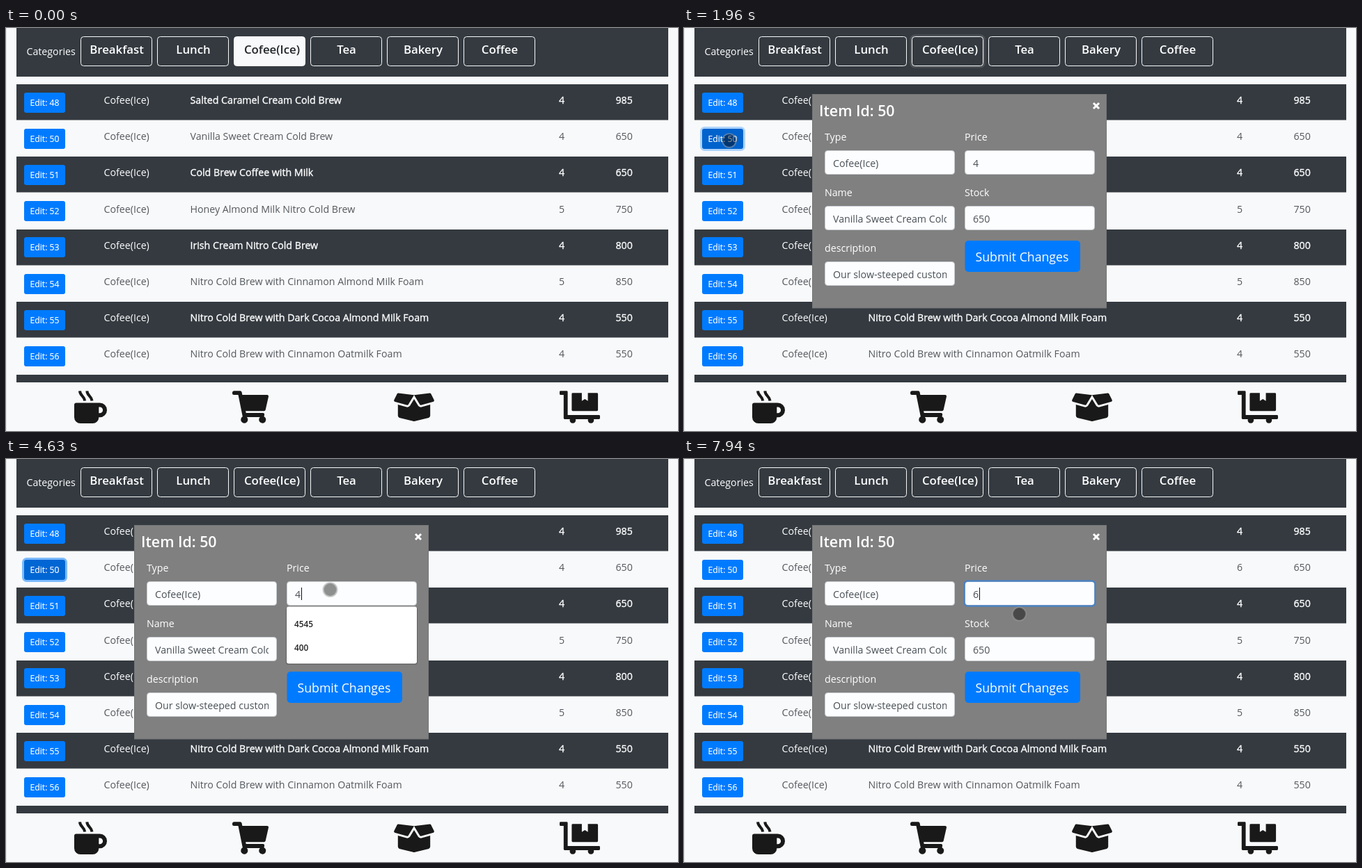
These frames come from a looping animation (965x580 px, 8000 ms). An HTML page:

```html
<!DOCTYPE html>
<html lang="en">
<head>
<meta charset="utf-8">
<title>Menu inventory</title>
<style>
  html, body { margin: 0; width: 100%; height: 100%; overflow: hidden; background: #f8f9fa; }
  svg { display: block; width: 965px; height: 580px; }
  text { font: 14.2px "Open Sans", "Noto Sans", sans-serif; fill: #fff; white-space: pre; }
  .tab { font-size: 16.8px; font-weight: 600; text-anchor: middle; }
  .edit { font-size: 12.2px; stroke: #fff; stroke-width: .15px; }
  .light { fill: #54585d; }
  .strong { stroke: #fff; stroke-width: .35px; }
  .title { font-size: 21.3px; font-weight: 600; }
  .value { fill: #495057; }
  .submit { font-size: 17.7px; }
  .option { font-size: 11.8px; font-weight: 600; fill: #222; }
  .icon { fill: #191919; fill-rule: evenodd; }

  /* One loop is 8000 ms, so 1% equals 80 ms. */
  .anim { animation: 8s step-end infinite; }
  #tabFill { animation-name: tabFill; }
  #tabText { animation-name: tabText; }
  #tabRing { animation-name: tabRing; }
  #editFill { animation-name: editFill; }
  #editRing { animation-name: editRing; }
  #modal { animation-name: modal; }
  #inputRing { animation-name: inputRing; }
  #options { animation-name: options; }
  #caret { animation-name: caret; }
  #dot { animation-name: dot; }
  .before { animation-name: before; }
  .after { animation-name: after; }

  @keyframes tabFill { 0% { fill: #f8f9fa } 23% { fill: #85898d } 24.5%, 100% { fill: #343a40 } }
  @keyframes tabText { 0% { fill: #212529 } 23% { fill: #a6a9ab } 24.5%, 100% { fill: #fff } }
  @keyframes tabRing { 0% { opacity: 0 } 20% { opacity: .5 } 21.5% { opacity: 1 } 24.5% { opacity: .25 } 26%, 100% { opacity: 0 } }
  @keyframes editFill {
    0% { fill: #007bff } 23% { fill: #006ce0 } 24.5% { fill: #0062cc }
    26% { fill: #0066d3 } 59.375% { fill: #0071ea } 60.875%, 100% { fill: #007bff }
  }
  @keyframes editRing { 0% { opacity: 0 } 24.5% { opacity: .6 } 26% { opacity: 1 } 59.375% { opacity: .5 } 60.875%, 100% { opacity: 0 } }
  @keyframes modal { 0% { opacity: 0 } 24.5%, 100% { opacity: 1 } }
  @keyframes inputRing { 0% { opacity: 0 } 59.375% { opacity: .6 } 60.875%, 100% { opacity: 1 } }
  @keyframes options { 0% { opacity: 0 } 57.875% { opacity: 1 } 75.625%, 100% { opacity: 0 } }
  @keyframes before { 0% { opacity: 1 } 75.625%, 100% { opacity: 0 } }
  @keyframes after { 0% { opacity: 0 } 86.5%, 100% { opacity: 1 } }
  @keyframes caret {
    0% { opacity: 0; transform: translateX(8px) }
    57.875% { opacity: 1; transform: translateX(8px) }
    64% { opacity: 0; transform: translateX(8px) }
    70.625% { opacity: 1; transform: translateX(8px) }
    75.625% { opacity: 1; transform: none }
    80.25% { opacity: 0; transform: none }
    86.5% { opacity: 1; transform: translateX(8px) }
    93% { opacity: 0; transform: translateX(8px) }
    99.25%, 100% { opacity: 1; transform: translateX(8px) }
  }
  @keyframes dot {
    0% { opacity: 0; transform: translate(65px, 162px) }
    3.5% { opacity: 1; transform: translate(65px, 162px) }
    23% { opacity: 0; transform: translate(65px, 162px) }
    24.5% { opacity: 1; transform: translate(65px, 162px) }
    40.125% { opacity: 1; transform: translate(71px, 174px) }
    42% { opacity: 1; transform: translate(100px, 205px) }
    43.5% { opacity: 1; transform: translate(175px, 252px) }
    45% { opacity: 1; transform: translate(260px, 274px) }
    46.5% { opacity: 0; transform: translate(260px, 274px) }
    48.375% { opacity: 1; transform: translate(381px, 255px) }
    50.25% { opacity: 1; transform: translate(421px, 224px) }
    51.75% { opacity: 1; transform: translate(450px, 200px) }
    53.25% { opacity: 1; transform: translate(465.5px, 188px) }
    59.375% { opacity: 1; transform: translate(467px, 190px) }
    99.25%, 100% { opacity: 1; transform: translate(481.5px, 223px) }
  }
</style>
</head>
<body>
<svg id="stage" viewBox="0 0 965 580"></svg>
<script>
  const rect = (x, y, w, h, fill, attrs = '') =>
    `<rect x="${x}" y="${y}" width="${w}" height="${h}" fill="${fill}" ${attrs}/>`;
  const text = (x, y, str, cls = '', attrs = '') =>
    `<text x="${x}" y="${y}" class="${cls}" ${attrs}>${str}</text>`;
  const ring = (id, x, y, w, h, color, width) =>
    rect(x, y, w, h, 'none', `id="${id}" class="anim" rx="5" stroke="${color}" stroke-width="${width}"`);

  const ROW = 52.2;
  const items = [
    [48, 'Salted Caramel Cream Cold Brew', 4, 985],
    [50, 'Vanilla Sweet Cream Cold Brew', 4, 650],
    [51, 'Cold Brew Coffee with Milk', 4, 650],
    [52, 'Honey Almond Milk Nitro Cold Brew', 5, 750],
    [53, 'Irish Cream Nitro Cold Brew', 4, 800],
    [54, 'Nitro Cold Brew with Cinnamon Almond Milk Foam', 5, 850],
    [55, 'Nitro Cold Brew with Dark Cocoa Almond Milk Foam', 4, 550],
    [56, 'Nitro Cold Brew with Cinnamon Oatmilk Foam', 4, 550],
  ];

  function tab(name, i) {
    const x = 107.5 + 110 * i, active = i === 2;
    const label = text(active ? 382 : x + 51.5, 37, name, active ? 'tab anim' : 'tab', active ? 'id="tabText"' : '');
    return (active ? ring('tabRing', 326, 11, 105, 45, '#999c9f', 3) : '') +
      rect(x, 12.5, 102, 42, 'none', `rx="4" stroke="#f8f9fa" ${active ? 'id="tabFill" class="anim"' : ''}`) + label;
  }

  function row([id, name, price, stock], i) {
    const top = 81 + ROW * i, base = Math.round(top + 28), dark = i % 2 === 0;
    const edited = id === 50, cls = dark ? 'strong' : 'light';
    const btnY = Math.round(top + 11.5);
    return (dark ? rect(15, Math.round(top), 936, 51.5, '#343a40') : '') +
      (edited ? ring('editRing', 24.5, btnY - 1.5, 62, 32, '#7cbafd', 3) : '') +
      rect(26, btnY, 59, 29, '#007bff', `rx="3" ${edited ? 'id="editFill" class="anim"' : ''}`) +
      text(34.5, btnY + 19, `Edit: ${id}`, 'edit') +
      text(140.5, base, 'Cofee(Ice)', dark ? '' : 'light') +
      text(264.5, base, name, cls) +
      (edited
        ? text(794, base, 4, 'light anim before') + text(794, base, 6, 'light anim after')
        : text(794, base, price, cls)) +
      text(875.5, base, stock, cls);
  }

  function field(label, x, y, value) {
    return text(x, y - 14, label) +
      rect(x + .5, y + .5, 186, 34, '#fcfdfe', 'rx="4" stroke="#c6cbd0"') +
      `<svg x="${x + 12}" y="${y}" width="163" height="35">${text(0, 23.5, value, 'value')}</svg>`;
  }

  const modal = `<g id="modal" class="anim">
    ${rect(184.5, 95.5, 422, 307.5, '#808080', 'stroke="#757575"')}
    ${text(194, 127, 'Item Id: 50', 'title')}
    <path d="M588 108l8 8m0-8l-8 8" stroke="#fff" stroke-width="3"/>
    ${field('Type', 202, 176, 'Cofee(Ice)')}
    ${field('Price', 403, 176, '')}
    ${field('Name', 202, 256, 'Vanilla Sweet Cream Cold Brew')}
    ${field('Stock', 403, 256, '650')}
    ${field('description', 202, 336, 'Our slow-steeped custom blend')}
    ${text(415, 199.5, 4, 'value anim before')}
    ${text(415, 199.5, 6, 'value anim after')}
    ${ring('inputRing', 402.5, 175.5, 188, 36, '#4b82c2', 2.5)}
    ${rect(416, 185, 1, 18, '#111', 'id="caret" class="anim"')}
    ${rect(403.5, 306, 165.5, 45, '#007bff', 'rx="5"')}
    ${text(418.5, 336, 'Submit Changes', 'submit')}
    <g id="options" class="anim">
      ${rect(402, 213, 189, 83, '#000', 'rx="4" opacity=".25"')}
      ${rect(403, 212.5, 187, 82, '#fff', 'rx="3"')}
      ${text(414, 242, 4545, 'option')}
      ${text(414, 275.5, 400, 'option')}
    </g>
  </g>`;

  const icon = (x, y, scale, d) => `<path class="icon" transform="translate(${x} ${y}) scale(${scale})" d="${d}"/>`;
  const icons =
    icon(0, 0, 1, 'M101 539.6H134.7a10.3 10.3 0 0 1 0 20.6H133.3a8.8 8.8 0 0 1-8.8 8.8H106.8a8.8 8.8 0 0 1-8.8-8.8V542.5a2.9 2.9 0 0 1 3-2.9zM133.3 545.5v8.8h1.4a4.4 4.4 0 0 0 0-8.8z') +
    '<path d="M106 522.3c.5 7.5 6.3 7 7.2 14.2m3.1-14.2c.5 7.5 6.3 7 7.2 14.2" fill="none" stroke="#191919" stroke-width="4"/>' +
    icon(325, 522.3, .0903, 'M24 0H126q18 2 24 20l9 44H552q28 3 23 29l-47 208q-5 17-23 19H212l6 32H487q27 3 23 29l-6 27a56 56 0 1 1-64 10H231a56 56 0 1 1-67-9L94 64H24Q0 62 0 40V24Q2 2 24 0z') +
    icon(557, 522.5, .0906, 'M426 256q-28-2-42-23L320 126 256 233q-20 28-55 21L64 215V393q2 25 24 31l216 54q16 4 32 0l216-54q22-7 24-31V215L439 254zM638 144 587 41q-6-10-17-9L320 64l92 152q7 9 18 7l198-56q15-8 10-23zM53 41 2 144q-5 16 10 23l198 56q12 2 18-7L320 64 70 32q-12 0-17 9z') +
    icon(795, 522.3, .0906, 'M208 320H592q16 0 16-16V48q0-16-16-16H448V160l-48-32-48 32V32H208q-16 0-16 16V304q0 16 16 16zM624 384H128V16Q128 0 112 0H16Q0 0 0 16V48Q0 64 16 64H64V432q0 16 16 16h83a48 48 0 1 0 90 0H451a48 48 0 1 0 90 0h83q16 0 16-16V400q0-16-16-16z');

  const tabs = ['Breakfast', 'Lunch', 'Cofee(Ice)', 'Tea', 'Bakery', 'Coffee'];

  document.getElementById('stage').innerHTML =
    rect(0, 0, 965, 580, '#f8f9fa') + rect(0, 0, 1, 580, '#e4e6e8') +
    rect(15, 0, 936, 70, '#343a40') + text(29.5, 39, 'Categories') +
    tabs.map(tab).join('') + items.map(row).join('') +
    rect(15, 499, 936, 11, '#343a40') + icons + modal +
    `<g id="dot" class="anim">
      <circle r="9.8" fill="none" stroke="#969696" stroke-opacity=".55" stroke-width="2"/>
      <circle r="9" fill="#000" fill-opacity=".44"/>
    </g>`;
</script>
</body>
</html>
```
